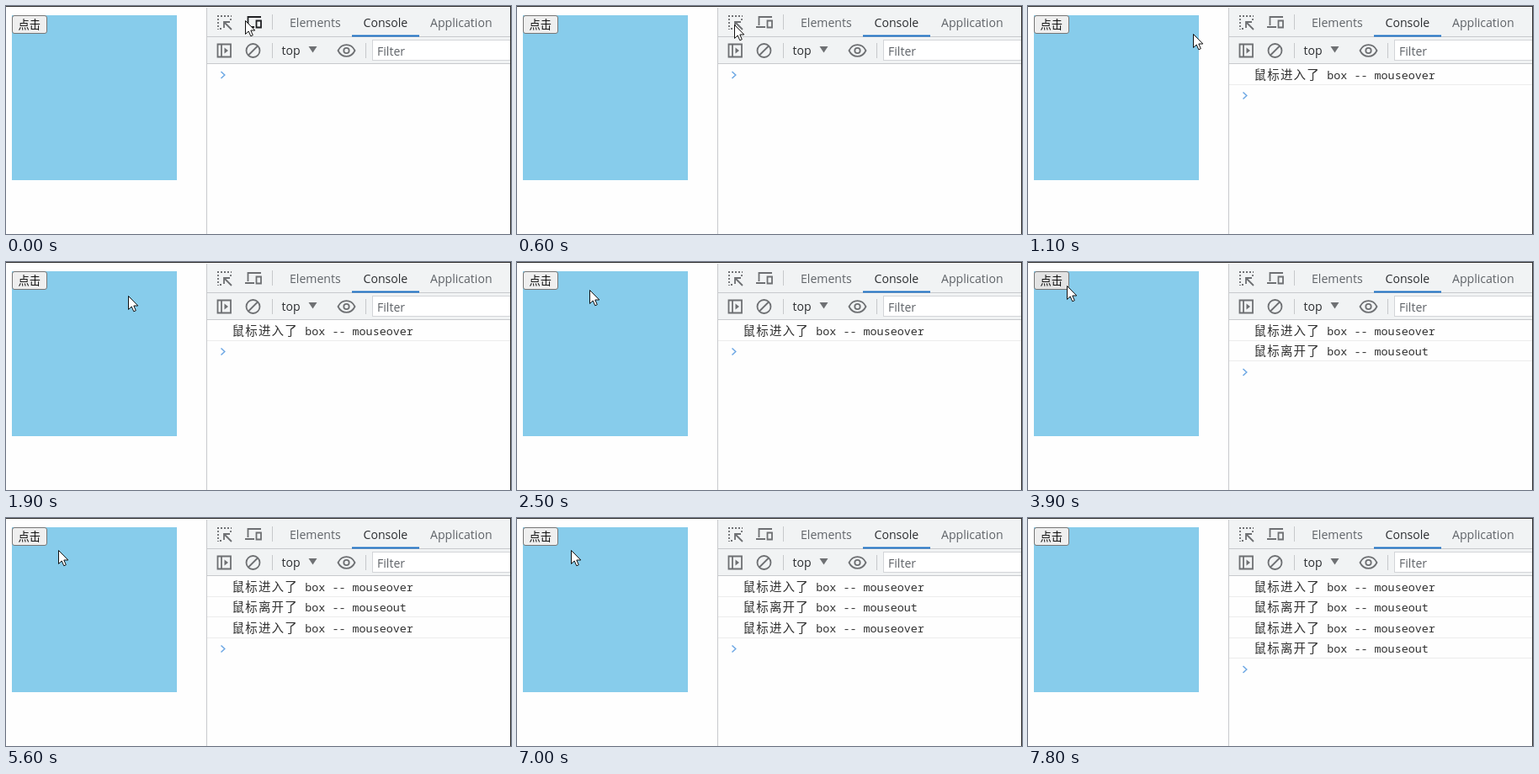
An HTML page that plays this animation: 600 px wide and 271 px high, repeating every 8300 ms.

```html
<!DOCTYPE html>
<html lang="zh">
<head>
<meta charset="utf-8">
<title>mouseover / mouseout</title>
<style>
html, body { margin: 0; width: 100%; height: 100%; overflow: hidden; background: #fefefe; }
svg { display: block; width: 600px; height: 271px; }
text { white-space: pre; }
.ui { font: 14.1px "Open Sans", "Noto Sans", sans-serif; fill: #5f6368; }
.ui .on { fill: #2b2d30; }
.cjk { font: 14.5px "Noto Sans CJK SC", "Noto Sans CJK", sans-serif; letter-spacing: 1.2px; }
.mono { font: 13.4px "Noto Sans Mono", "DejaVu Sans Mono", monospace; }
.log { fill: #303030; }
.btn { font: 13.3px "Noto Sans CJK SC", "Noto Sans CJK", sans-serif; fill: #111; }
.icon { fill: none; stroke: #6e7073; stroke-width: 1.8; }
.crisp { shape-rendering: crispEdges; }
</style>
</head>
<body>
<svg viewBox="0 0 600 271">
  <rect width="600" height="271" fill="#fefefe"/>

  <!-- page -->
  <rect class="crisp" x="7" y="11" width="196" height="196" fill="#87cceb"/>
  <rect id="btn" x="7.5" y="11.5" width="41" height="21" rx="2.5" fill="#efefef" stroke="#767676"/>
  <text class="btn" x="14.5" y="27">点击</text>

  <!-- toolbars -->
  <g class="crisp">
    <rect x="239" y="2" width="361" height="67" fill="#f1f3f4"/>
    <path d="M239 36.5H600M239 68.5H600M238.5 2V271" stroke="#c8cacd"/>
    <path d="M316.5 10V28M316.5 44V62M427.5 44V62" stroke="#c6c8cb"/>
    <rect x="435.5" y="40.5" width="170" height="24" fill="#fff" stroke="#d3d5d8"/>
  </g>
  <rect x="411" y="34.5" width="80" height="2" fill="#1a6fc4"/>
  <g class="ui">
    <text x="337" y="25">Elements</text>
    <text class="on" x="424.5" y="25">Console</text>
    <text x="504" y="25">Application</text>
    <text class="on" x="327.5" y="58">top</text>
    <text x="441" y="59">Filter</text>
  </g>
  <path d="M359.5 48H369.5L364.5 55.5Z" fill="#6e7073"/>

  <g class="icon">
    <path d="M251 12H268M252 15V28M267 15V17M254 27H257" stroke-dasharray="2 2"/>
    <path d="M268 28L259.5 19.5M259 26V19H266"/>
    <path id="device" d="M303 13H287.5V23M284 25H295M297.5 17.5H303V25.5H297.5Z"/>
    <path d="M251.5 45.5H267V60.5H251.5ZM256 45V61"/>
    <path d="M259.5 49.5L264 53L259.5 56.5Z" fill="#6e7073" stroke="none"/>
    <circle cx="293.5" cy="53" r="8"/>
    <path d="M288 58.5L299 47.5"/>
    <path d="M394.5 53C399 43.8 410 43.8 414.5 53C410 62.2 399 62.2 394.5 53Z"/>
    <circle cx="404.5" cy="53" r="3.2"/>
  </g>

  <!-- console -->
  <g id="logs"></g>
  <path id="prompt" d="M255.5 78L259.8 82L255.5 86" fill="none" stroke="#6ea8e4" stroke-width="1.5"/>

  <!-- window edges -->
  <path class="crisp" d="M0 .5H600M599.5 0V271" stroke="#2e2e2e"/>

  <path id="cursor" d="M.5 .5V16.5L4.2 13L6.8 18.8L9.3 17.7L6.8 12H11.8Z" fill="#fff" stroke="#111" stroke-linejoin="round"/>
</svg>
<script>
const LOOP = 8300, STEP = 100, ROW = 24.5;
const $ = id => document.getElementById(id);

const speedUp = p => p * p;
const slowDown = p => p * (2 - p);
const smooth = p => p * p * (3 - 2 * p);

// pointer moves: start and end time, where to, easing
const home = [284, 17];
const moves = [
  [0, 1100, 196, 33, speedUp],
  [1100, 1500, 147, 40, slowDown],
  [1800, 2700, 77, 32, smooth],
  [2700, 3400, 46, 28, smooth],
  [5200, 5600, 62, 38, smooth],
  [6900, 7000, 64, 38, smooth],
  [7000, 7600, 38, 340, speedUp]
];

function pointer(t) {
  let [x, y] = home;
  for (const [t0, t1, toX, toY, ease] of moves) {
    const p = ease(Math.min(1, Math.max(0, (t - t0) / (t1 - t0))));
    x += (toX - x) * p;
    y += (toY - y) * p;
  }
  return [Math.round(x), Math.round(y)];
}

const onButton = (x, y) => x < 49 && y < 33;
const onBox = (x, y) => x < 203 && y < 207 && !onButton(x, y);

// a line is logged each time the pointer enters or leaves the box
const events = [];
for (let t = 0, was = false; t < LOOP; t += STEP) {
  const inside = onBox(...pointer(t));
  if (inside !== was) events.push({ t, inside });
  was = inside;
}

$("logs").innerHTML = events.map(({ inside }, i) => `
  <g class="log" transform="translate(0 ${Math.floor(i * ROW)})">
    <text class="cjk" x="268.5" y="87">鼠标${inside ? "进入" : "离开"}了</text>
    <text class="mono" x="355.3" y="87.3">box -- ${inside ? "mouseover" : "mouseout"}</text>
    <path class="crisp" d="M239 93.5H599" stroke="#ececec"/>
  </g>`).join("");
const rows = [...$("logs").children];

const show = (el, on) => el.setAttribute("visibility", on ? "visible" : "hidden");

function draw(now) {
  const t = Math.floor(now % LOOP / STEP) * STEP;
  const [x, y] = pointer(t);
  const count = events.filter(e => e.t <= t).length;
  rows.forEach((row, i) => show(row, i < count));
  show($("cursor"), y < 271);
  $("prompt").setAttribute("transform", `translate(0 ${count * ROW})`);
  $("cursor").setAttribute("transform", `translate(${x} ${y})`);
  $("btn").setAttribute("fill", onButton(x, y) ? "#e3e3e3" : "#efefef");
  $("device").setAttribute("stroke", x > 280 ? "#202124" : "#6e7073");
}

const start = performance.now();
function tick() {
  draw(performance.now() - start);
  requestAnimationFrame(tick);
}
tick();
</script>
</body>
</html>
```
